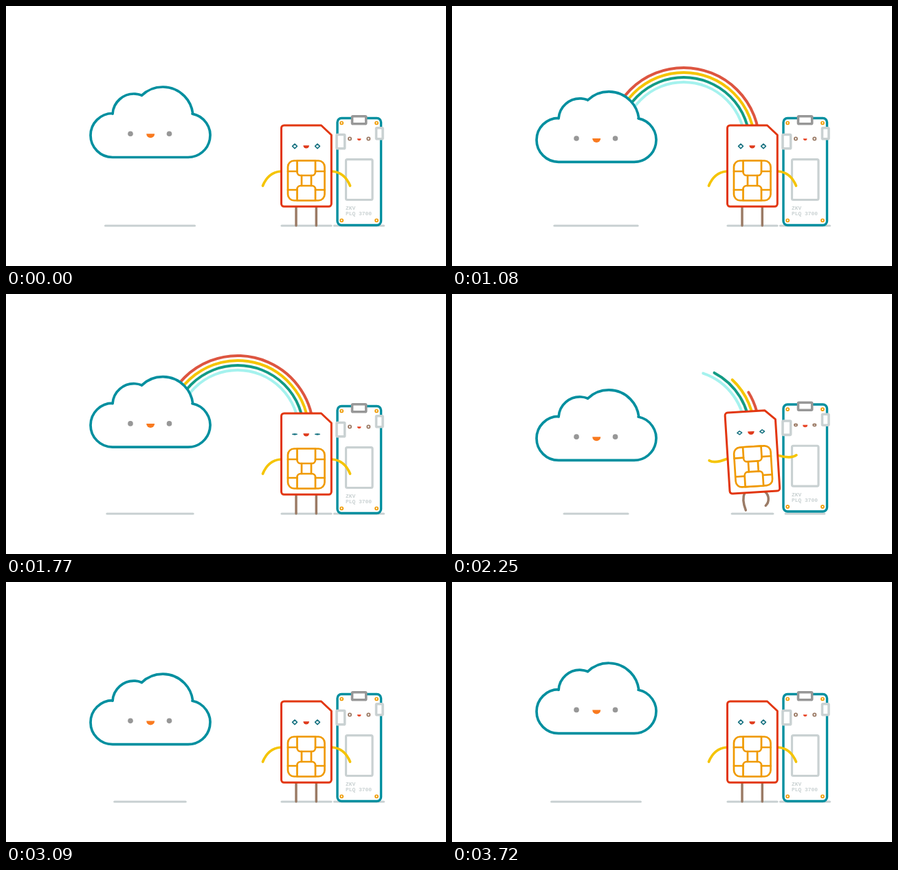
An HTML page with a canvas for the animation above (3.75 s loop, 640x379 px).

```html
<!DOCTYPE html>
<html lang="en">
<head>
<meta charset="utf-8">
<title>Cloud rainbow</title>
<style>
html, body { margin: 0; width: 100%; height: 100%; overflow: hidden; background: #fff; }
canvas { display: block; }
</style>
</head>
<body>
<canvas id="stage" width="640" height="379"></canvas>
<script>
const ctx = document.getElementById('stage').getContext('2d');
const LOOP = 3750;
const TEAL = '#008f9f', RED = '#e2360f', AMBER = '#f09a00', YELLOW = '#f5c400';
const PALE = '#c9d1d2', GRAY = '#979797', BROWN = '#9b7b66';
const CLOUD_TOPS = [0, 908, 1876, 2800, LOOP];
const SHADOW_TOPS = [0, 937, 1876, 2812, LOOP];
const HOP_START = 2215, HOP = 170, HOPS = 4;

const clamp = v => Math.min(1, Math.max(0, v));
const mix = (a, b, k) => a + (b - a) * k;
const ramp = (t, from, to) => clamp((t - from) / (to - from));

function bob(t, tops) {
  let i = 0;
  while (i < tops.length - 2 && t >= tops[i + 1]) i++;
  return Math.sin(Math.PI * (t - tops[i]) / (tops[i + 1] - tops[i])) ** 2;
}

// Eye openness, 1 = fully open
function blink(t, times) {
  return Math.min(1, ...times.map(c => Math.max(0.2, Math.abs(t - c) / 100)));
}

function sway(t, start) {
  const phase = (t - start) / HOP;
  return phase > 0 && phase < HOPS ? -Math.sin(Math.PI * phase) : 0;
}

function stroke(color, width) {
  ctx.strokeStyle = color;
  ctx.lineWidth = width;
  ctx.stroke();
}

function fill(color) {
  ctx.fillStyle = color;
  ctx.fill();
}

function line(color, width, ...points) {
  ctx.beginPath();
  points.forEach(([x, y]) => ctx.lineTo(x, y));
  stroke(color, width);
}

function box(x1, y1, x2, y2, radius, color, width) {
  ctx.beginPath();
  ctx.roundRect(x1, y1, x2 - x1, y2 - y1, radius);
  fill('#fff');
  stroke(color, width);
}

function disc(x, y, r, color) {
  ctx.beginPath();
  ctx.arc(x, y, r, 0, Math.PI * 2);
  fill(color);
}

function smile(x, y, r, color) {
  ctx.beginPath();
  ctx.arc(x, y, r, 0, Math.PI);
  fill(color);
}

function shadow(x, half) {
  line(PALE, 3, [x - half, 320.3], [x + half, 320.3]);
}

function posed(x, y, lift, degrees, draw) {
  ctx.save();
  ctx.translate(x, y - lift);
  ctx.rotate(degrees * Math.PI / 180);
  ctx.translate(-x, -y);
  draw();
  ctx.restore();
}

function drawRainbow(t) {
  const bands = [
    ['#dd5540', 110, 0], [YELLOW, 103, 60],
    ['#129b84', 96, 120], ['#a5f2ee', 89, 155]
  ];
  for (const [color, radius, delay] of bands) {
    const head = ramp(t, 30 + delay, 720 + delay);
    const tail = ramp(t, 1680 + delay, 2370 + delay);
    if (head <= tail) continue;
    ctx.beginPath();
    ctx.arc(337, 200, radius, Math.PI * (1 + tail), Math.PI * (1 + head));
    stroke(color, 4);
  }
}

function drawCloud(t) {
  shadow(209.5, 65 - 20.5 * bob(t, SHADOW_TOPS));
  ctx.save();
  ctx.translate(0, 24 * bob(t, CLOUD_TOPS));
  ctx.beginPath();
  ctx.moveTo(155, 220.5);
  ctx.arc(155, 188.5, 32, Math.PI / 2, Math.PI * 1.5);
  ctx.arc(186, 159, 31, Math.PI * 1.02, Math.PI * 1.615);
  ctx.arc(228, 162, 44, Math.PI * 1.255, Math.PI * 1.96);
  ctx.arc(265, 188.5, 32, Math.PI * 1.56, Math.PI * 2.5);
  ctx.closePath();
  fill('#fff');
  stroke(TEAL, 3.7);
  disc(181, 186.2, 3.8, GRAY);
  disc(237.5, 186.2, 3.8, GRAY);
  smile(210.2, 186.3, 6, '#f97a1f');
  ctx.restore();
}

function drawBoard(open, joy) {
  box(482, 163.5, 545.5, 319.5, 6, TEAL, 3.4);
  box(503.5, 160.7, 523.7, 171.7, 1, GRAY, 3.6);
  box(481, 187.5, 492.7, 207.8, 1, PALE, 3.6);
  box(538.5, 177.7, 548, 193.7, 1, PALE, 3.6);
  box(494.5, 223.7, 533, 282.5, 2, PALE, 3.2);
  for (const x of [488.2, 539]) for (const y of [170.5, 312.5]) {
    ctx.beginPath();
    ctx.arc(x, y, 2, 0, Math.PI * 2);
    stroke(AMBER, 1.7);
  }
  for (const x of [500, 527.3]) {
    ctx.beginPath();
    ctx.ellipse(x, 193.5, 2.1, 2.1 * open, 0, 0, Math.PI * 2);
    stroke(BROWN, 1.8);
  }
  smile(513.7, 193.2, mix(2.8, 4.8, joy), '#e8472a');
  ctx.fillStyle = PALE;
  ctx.font = 'bold 7.9px "Liberation Mono", monospace';
  ctx.fillText('ZKV', 494, 297.3);
  ctx.fillText('PLQ 3700', 494, 305.3);
}

function drawLeg(x, side, kick, bend) {
  ctx.beginPath();
  ctx.moveTo(x, 292);
  const out = side * mix(5, 10, bend) * kick;
  const foot = mix(320, mix(316, 308, bend), kick);
  ctx.bezierCurveTo(x + out, mix(300, 296, kick), x + out, mix(310, 306, kick), x, foot);
  stroke(BROWN, 3.5);
}

function drawSim(open, joy, hop, tilt) {
  drawLeg(422, -1, hop, tilt > 0 ? 1 : 0);
  drawLeg(451.3, 1, hop, tilt < 0 ? 1 : 0);
  for (const side of [-1, 1]) {
    const x = d => 437 + side * d;
    ctx.beginPath();
    ctx.moveTo(x(37.5), 241);
    ctx.quadraticCurveTo(x(55.5), mix(242.5, 250, hop), x(63.5), mix(262, 229.5, hop));
    stroke(YELLOW, 3.7);
  }

  ctx.beginPath();
  ctx.moveTo(404.5, 174);
  ctx.lineTo(458.5, 174);
  ctx.lineTo(473.3, 188);
  ctx.arcTo(473.3, 292.3, 460, 292.3, 4);
  ctx.arcTo(400.5, 292.3, 400.5, 280, 4);
  ctx.arcTo(400.5, 174, 410, 174, 4);
  ctx.closePath();
  fill('#fff');
  stroke(RED, 3);

  box(410, 225.5, 463.5, 283.5, 9, AMBER, 2.7);
  box(423.5, 225.5, 450, 247, [0, 0, 5, 5], AMBER, 2.7);
  box(423.5, 262, 450, 283.5, [5, 5, 0, 0], AMBER, 2.7);
  for (const x of [430, 444]) line(AMBER, 2.7, [x, 247], [x, 262]);
  for (const y of [241, 268]) {
    line(AMBER, 2.7, [410, y], [423.5, y]);
    line(AMBER, 2.7, [450, y], [463.5, y]);
  }

  for (const x of [420, 453]) {
    const h = 3.4 * open;
    ctx.beginPath();
    ctx.moveTo(x - 3.4, 204.4);
    ctx.lineTo(x, 204.4 - h);
    ctx.lineTo(x + 3.4, 204.4);
    ctx.lineTo(x, 204.4 + h);
    ctx.closePath();
    stroke('#13707f', mix(1.1, 1.6, open));
  }
  smile(436.7, 203.3, mix(4.3, 5.7, joy), '#df3a1c');
}

function drawSparks(t) {
  const p = ramp(t, 2390, 2810);
  if (p <= 0 || p >= 1) return;
  const radius = 62 * (1 - (1 - p) ** 3);
  ctx.globalAlpha = 1 - p;
  for (let i = 0; i < 7; i++) {
    const a = (176 + 29.5 * i) * Math.PI / 180;
    disc(429 + radius * Math.cos(a), 158 + radius * Math.sin(a), 3.3, YELLOW);
  }
  ctx.globalAlpha = 1;
}

function render(t) {
  const simSway = sway(t, HOP_START);
  const hop = Math.abs(simSway);
  const joy = Math.min(ramp(t, 2215, 2315), 1 - ramp(t, 2860, 2960));
  const squint = mix(1, 0.25, joy);

  ctx.fillStyle = '#fff';
  ctx.fillRect(0, 0, 640, 379);
  ctx.lineCap = 'round';
  ctx.lineJoin = 'round';

  drawRainbow(t);
  drawCloud(t);
  shadow(437, mix(36, 26, hop));
  shadow(513.5, mix(36, 23.5, hop));
  drawSparks(t);
  posed(514, 320, 4 * hop, 6.5 * sway(t, 2291), () =>
    drawBoard(Math.min(squint, blink(t, [300, 1400, 2000])), joy));
  posed(436.7, 233, 5 * hop, 5.8 * simSway, () =>
    drawSim(Math.min(squint, blink(t, [550, 1780])), joy, hop, simSway));
}

function frame() {
  render(performance.now() % LOOP);
  requestAnimationFrame(frame);
}
frame();
</script>
</body>
</html>
```
